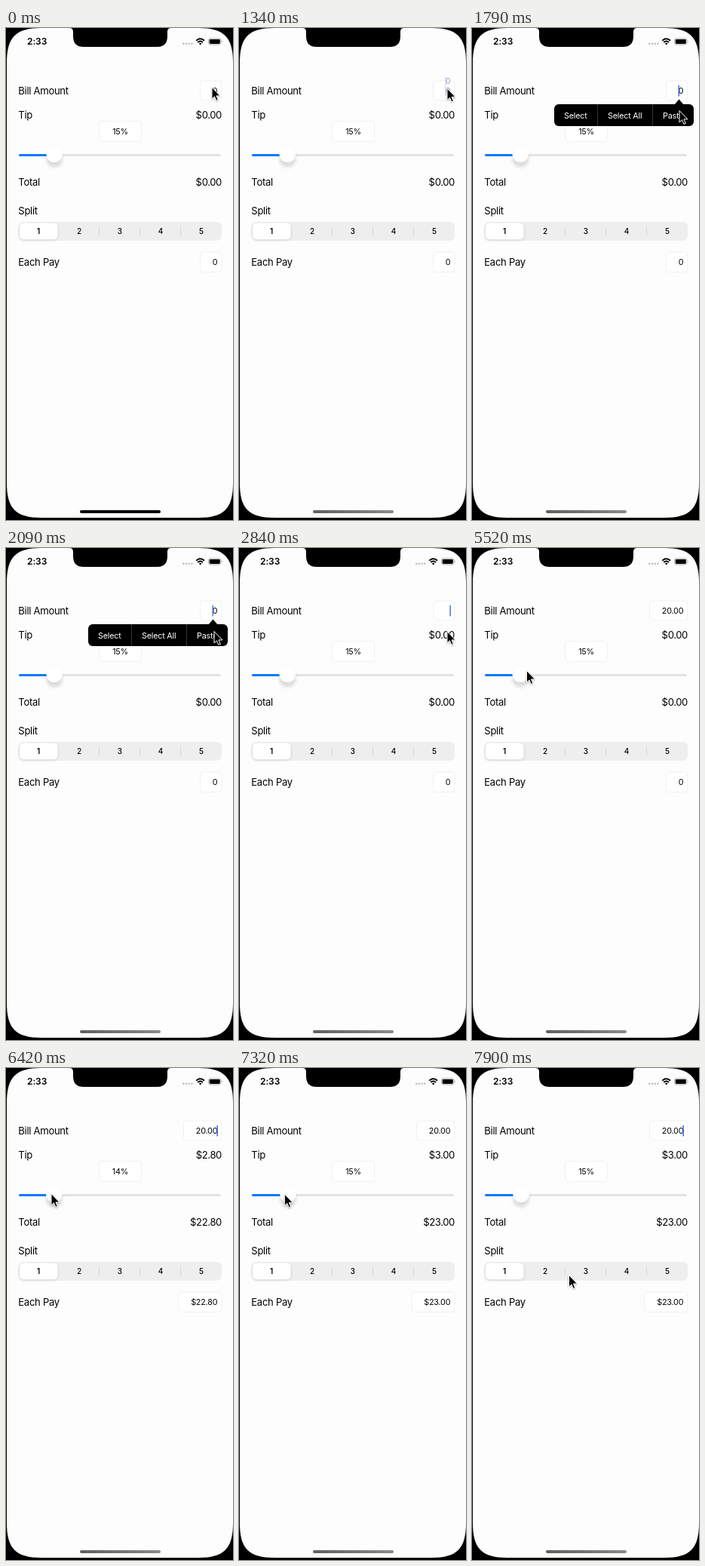
Recreate the animation shown at these times as an HTML page. Size 301 by 652 pixels, loop 8 s.

```html
<!DOCTYPE html>
<html lang="en">
<head>
<meta charset="utf-8">
<title>Tip calculator</title>
<style>
  html, body { margin: 0; width: 100%; height: 100%; overflow: hidden; background: #000; }
  svg { display: block; width: 100%; height: 100%; font-family: Inter, Roboto, sans-serif; }
  .body { font-size: 13.1px; letter-spacing: -.31px; }
  .amount { letter-spacing: -.38px; text-anchor: end; }
  .small { font-size: 10.8px; letter-spacing: -.22px; }
  .end { text-anchor: end; }
  .mid { text-anchor: middle; }
  .box { fill: #fff; stroke: #f1f1f2; }
  #cursor { filter: drop-shadow(0 1px 1px rgba(0, 0, 0, .3)); }
</style>
</head>
<body>
<svg viewBox="0 0 301 652" preserveAspectRatio="none">
  <defs>
    <linearGradient id="grey"><stop stop-color="#606060"/><stop offset="1" stop-color="#8a8a8a"/></linearGradient>
    <filter id="soft" x="-50%" y="-50%" width="200%" height="200%"><feGaussianBlur stdDeviation="2.2"/></filter>
  </defs>
  <path d="M1 46C1 12 13 0 47 0H255C289 0 301 12 301 46V603C301 637 289 649 255 649H47C13 649 1 637 1 603Z" fill="#fdfdfd"/>
  <path d="M84 0Q89 0 89 5V11Q89 25 103 25H200Q214 25 214 11V5Q214 0 219 0Z"/>

  <g id="status">
    <text x="28" y="22.3" font-size="12" font-weight="600" letter-spacing="-.1">2:33</text>
    <path d="M235.3 20.8H247" stroke="#b9b9bb" stroke-width="2.4" stroke-linecap="round" stroke-dasharray="0 3.7"/>
    <path d="M252.3 16.8Q257.7 11.8 263.1 16.8M254.3 19Q257.7 16 261.1 19" fill="none" stroke="#000" stroke-width="1.9"/>
    <path d="M255.8 20.5Q257.7 18.9 259.6 20.5L257.7 22.5Z"/>
    <rect x="268.5" y="13.9" width="16.5" height="8.2" rx="2.3" fill="none" stroke="#999" stroke-width=".8"/>
    <rect x="269.7" y="15.1" width="14.1" height="5.8" rx="1.3"/>
    <path d="M286 16.5Q287.6 18 286 19.5Z" fill="#999"/>
  </g>

  <g class="body">
    <text x="16.3" y="88">Bill Amount</text>
    <text x="16.3" y="120">Tip</text>
    <text x="16.3" y="209">Total</text>
    <text x="16.3" y="247">Split</text>
    <text x="16.3" y="315">Each Pay</text>
    <text id="tip" class="amount" x="286" y="120"/>
    <text id="total" class="amount" x="286" y="209"/>
  </g>

  <rect id="billBox" class="box" y="70" height="26" rx="4"/>
  <rect class="box" x="123.5" y="123.5" width="56" height="27" rx="4"/>
  <rect id="payBox" class="box" y="297" height="26.5" rx="4"/>
  <g class="small">
    <text id="bill" class="end" x="280.3" y="87"/>
    <text id="ghost" class="end" x="280.3" y="74" fill="#9a9ad0">0</text>
    <text id="rate" class="mid" x="151.5" y="141"/>
    <text id="pay" class="end" x="280.3" y="314.3"/>
  </g>
  <rect id="caret" width="1.6" fill="#4a6fe0"/>

  <rect x="17" y="167" width="268" height="3" rx="1.5" fill="#e3e3e4"/>
  <rect id="fill" x="17" y="167" height="3" rx="1.5" fill="#0a7aff"/>
  <g id="thumb">
    <circle cy="173.5" r="11" opacity=".13" filter="url(#soft)"/>
    <circle cy="167.3" r="10.8" fill="#fff" stroke="#000" stroke-opacity=".04" stroke-width=".5"/>
  </g>

  <rect x="16.5" y="257" width="269.5" height="24.8" rx="6" fill="#eeeeef"/>
  <rect x="18" y="260" width="50.5" height="21" rx="5" opacity=".14" filter="url(#soft)"/>
  <rect x="18" y="258.5" width="50.5" height="21.8" rx="5" fill="#fff"/>
  <path d="M123.5 263v13M177.5 263v13M231.5 263v13" stroke="#d9d9db"/>
  <g id="segments" class="mid" font-size="10"></g>

  <g id="menu">
    <path d="M268 102L274.5 94.5L281 102Z"/>
    <rect x="109" y="101" width="185" height="29" rx="6"/>
    <path d="M166.5 101v29M239.5 101v29" stroke="#444" stroke-width=".8"/>
    <g class="small" fill="#fff"><text x="122" y="119.5">Select</text><text x="180" y="119.5">Select All</text><text x="253" y="119.5">Paste</text></g>
  </g>

  <rect id="home" x="98" y="639" width="107" height="4" rx="2"/>
  <path id="cursor" d="M0 0V15.5L3.5 12.3L5.9 17.8L8.3 16.8L6 11.4H11Z" stroke="#fff"/>
</svg>
<script>
const LOOP = 8000, STEP = 148.5, EDGE = 280.3;
const $ = id => document.getElementById(id);
const set = (id, attrs) => { for (const k in attrs) $(id).setAttribute(k, attrs[k]); };
const label = (id, text) => { if ($(id).textContent !== text) $(id).textContent = text; };
const between = (t, a, b) => t >= a && t < b;
const clamp = v => Math.max(0, Math.min(1, v));
const ramp = (t, a, b) => clamp((t - a) / (b - a));
const ease = p => p * p * (3 - 2 * p);
const money = n => '$' + n.toFixed(2);

// Pointer moves: begin, end, dx, dy.
const moves = [
  [600, 1030, 3, 1.5], [1480, 1780, -1, 29.5], [1930, 1931, 1, 1],
  [4750, 4751, -42, 1], [4752, 5640, -174, 55], [7250, 7865, 68.5, 108]
];

function pointer(t) {
  let x = 273, y = 78.5;
  for (const [begin, end, dx, dy] of moves) {
    const p = ease(ramp(t, begin, end));
    x += dx * p;
    y += dy * p;
  }
  return [x, y];
}

function typed(t) {
  if (t < 2840) return '0';
  const keys = [2990, 3290, 3740, 4330, 4480];
  return '20.00'.slice(0, keys.filter(k => k <= t).length);
}

function caretAlpha(t) {
  if (t < 1040) return 0;
  if (between(t, 2390, 4620)) return .9;
  return clamp(.5 + Math.cos((t - 1790) / 1530 * 2 * Math.PI));
}

function fitBox(id, text) {
  const x = EDGE - Math.max(6, $(text).getComputedTextLength()) - 16.3;
  set(id, { x, width: 285.7 - x });
}

function draw(t) {
  const frame = Math.floor(t / STEP) * STEP;
  const value = t < 5820 ? 15 : t < 6870 ? 14.8 : 15.3;
  const rate = Math.floor(value), base = t < 5820 ? 0 : 20, tip = base * rate / 100;
  const thumb = 28 + 2.42 * value, loupe = between(t, 1190, 1640);

  label('bill', typed(t));
  label('rate', rate + '%');
  label('tip', money(tip));
  label('total', money(base + tip));
  label('pay', base ? money(base + tip) : '0');
  fitBox('billBox', 'bill');
  fitBox('payBox', 'pay');

  set('status', { opacity: +!loupe });
  set('ghost', { opacity: +loupe });
  set('bill', { opacity: loupe ? .45 : 1 });
  set('caret', { x: t < 2390 ? 273.4 : 279.4, y: loupe ? 65 : 76, height: loupe ? 25 : 14.5, opacity: caretAlpha(frame) });
  set('menu', { opacity: ramp(frame, 1480, 1780) - ramp(frame, 2080, 2370) });

  set('fill', { width: thumb - 17 });
  set('thumb', { transform: `translate(${thumb})` });
  set('home', { fill: t < 1040 ? '#000' : 'url(#grey)' });
  set('cursor', { transform: `translate(${pointer(frame)})` });
}

$('segments').innerHTML = [1, 2, 3, 4, 5].map(n =>
  `<text x="${n * 54 - 11}" y="273" font-weight="${n === 1 ? 600 : 500}">${n}</text>`).join('');

const start = performance.now();
function tick() {
  draw((performance.now() - start) % LOOP);
  requestAnimationFrame(tick);
}
tick();
</script>
</body>
</html>
```
